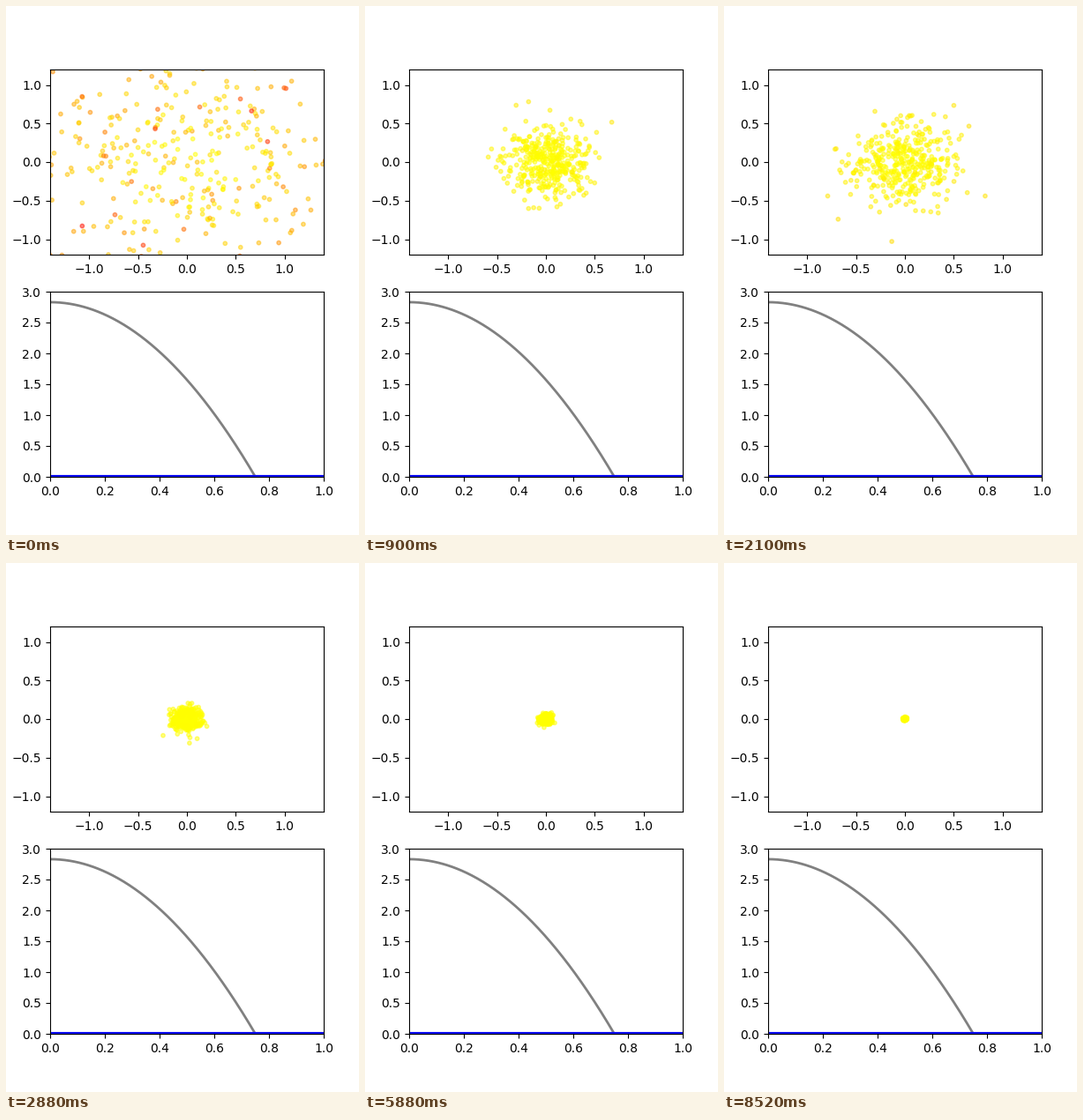
A matplotlib script that plays this animation: 400x600 px, repeating every 8580 ms.

```python
import numpy as np
import matplotlib.pyplot as plt
from matplotlib.animation import FuncAnimation

FRAMES, STEP = 143, 60
COUNT = 400
HALF_SWING = 2.066   # seconds between two collapses of the cloud
SPREAD, DECAY = 0.87, 1.83
KICK, KICK_DECAY = 0.385, 1.43
HOT = 8              # squared radius drawn in full red
RADIUS = 0.75        # edge of the density profile

rng = np.random.default_rng(12)
start = rng.normal(0, SPREAD, (COUNT, 3))
kick = rng.normal(0, KICK, (COUNT, 3))


def positions(t):
    """Damped oscillation of every particle in the trap."""
    phase = np.pi * t / HALF_SWING
    return (start * np.cos(phase) * np.exp(-t / DECAY)
            + kick * np.sin(phase) * np.exp(-t / KICK_DECAY))


def density(r):
    """Inverted parabola, zero outside the radius."""
    peak = 15 / (4 * np.pi * RADIUS ** 3)
    return peak * np.maximum(1 - (r / RADIUS) ** 2, 0)


fig, (trap, profile) = plt.subplots(2, 1, figsize=(4, 6), dpi=100)

trap.set(xlim=(-1.4, 1.4), ylim=(-1.2, 1.2))
cloud = trap.scatter(start[:, 0], start[:, 1], c=np.zeros(COUNT), s=10,
                     linewidths=1, cmap="autumn_r", vmin=0, vmax=1, alpha=0.5)

r = np.linspace(0, 1, 401)
profile.set(xlim=(0, 1), ylim=(0, 3))
profile.plot(r, density(r), color="gray", lw=2)
profile.plot(r, np.zeros_like(r), color="b", lw=3)


def update(i):
    p = positions(i * STEP / 1000)
    cloud.set_offsets(p[:, :2])
    cloud.set_array((p ** 2).sum(axis=1) / HOT)
    return (cloud,)


anim = FuncAnimation(fig, update, frames=FRAMES, interval=STEP,
                     repeat=True, repeat_delay=0)
plt.show()
```
